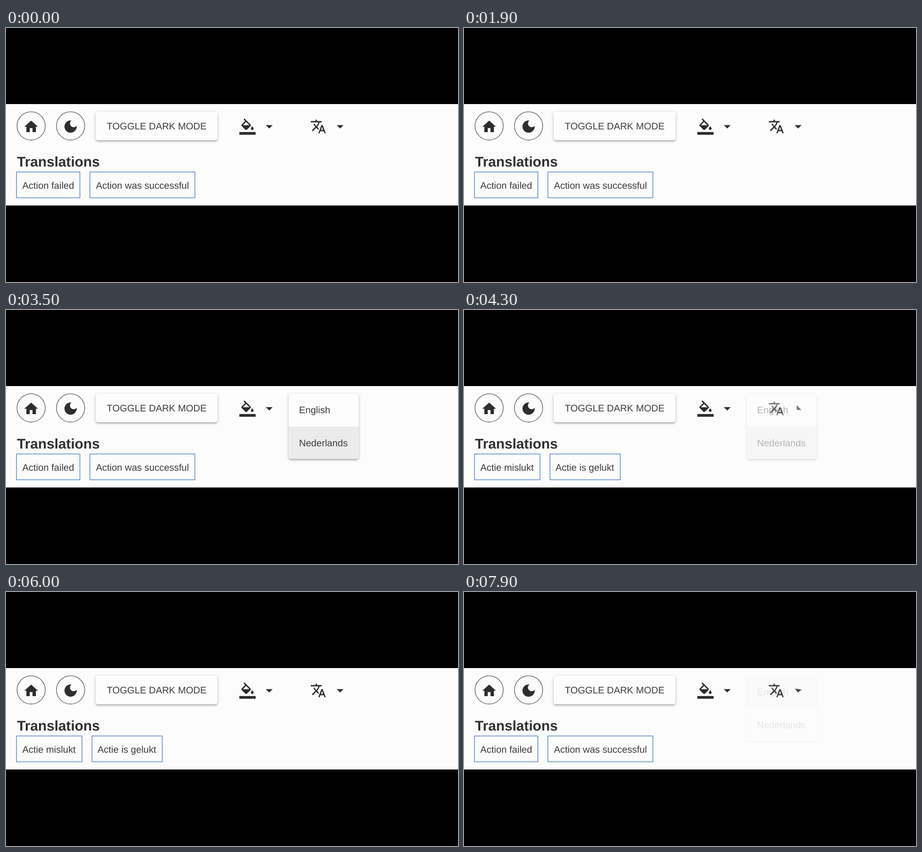
These frames come from a looping animation (998 px wide and 561 px high, 8 s). An HTML page:

```html
<!DOCTYPE html>
<html lang="en">
<head>
<meta charset="utf-8">
<title>Language menu</title>
<style>
  html, body { margin: 0; width: 100%; height: 100%; overflow: hidden; background: #000; }
  body { position: relative; }
  .page, .card, .menu, .row, svg { position: absolute; }
  .page { left: 0; top: 168px; width: 998px; height: 224px; background: #fcfcfc; }
  svg { left: 0; top: 0; width: 998px; height: 561px; }
  text { font: 21px "Liberation Sans", Arial, sans-serif; fill: #3b3b3b; text-rendering: geometricPrecision; }
  .title { font-size: 31px; font-weight: bold; fill: #303030; }
  .card, .menu {
    background: #fdfdfd; border-radius: 5px;
    box-shadow: 0 1.5px 7px rgba(0,0,0,.2), 0 3px 3px rgba(0,0,0,.14), 0 4px 2px -3px rgba(0,0,0,.12);
  }
  .card { left: 198px; top: 184.5px; width: 269px; height: 63px; }
  .menu { left: 624px; top: 184.5px; width: 154.5px; height: 144.5px; overflow: hidden; }
  .row { left: 0; top: 0; width: 100%; height: 72.5px; background: #ebebeb; }
  .menu svg { left: -624px; top: -184.5px; }
  .icon { fill: #2d2d2d; }
  .ring { fill: none; stroke: #555; stroke-width: 1.3; }
  .box { fill: none; stroke: #4a7fcd; stroke-width: 1.4; }

  .menu, .row, .hover, .ripple, .arrow, .english, .dutch { animation: 8s linear infinite; }
  .arrow, .ripple { transform-box: fill-box; transform-origin: center; }
  .menu { animation-name: fade; }
  .row { animation-name: pick; animation-timing-function: step-end; }
  .hover { animation-name: hover; }
  .ripple { animation-name: ripple; }
  .arrow { animation-name: turn; transform-origin: 50% 40%; }
  .english { animation-name: english; animation-timing-function: step-end; }
  .dutch { animation-name: dutch; animation-timing-function: step-end; }

  @keyframes fade {
    0%, 36.13%, 82.45% { opacity: 0; animation-timing-function: cubic-bezier(.215,.61,.355,1); }
    39.88%, 86.2% { opacity: 1; }
    52.75%, 97.45% { opacity: 1; animation-timing-function: cubic-bezier(.215,.61,.355,1); }
    56.5%, 100% { opacity: 0; }
  }
  @keyframes pick {
    0% { transform: none; }
    41.25% { transform: translateY(72.5px); }
    62.5%, 100% { transform: none; }
  }
  @keyframes hover {
    0%, 31.25%, 38.75%, 76.9%, 84%, 100% { opacity: 0; }
    33.75%, 36.25%, 79.4%, 81.75% { opacity: .14; }
  }
  @keyframes ripple {
    0%, 35.24% { opacity: 0; transform: scale(.2); }
    35.25%, 81.5% { opacity: .1; transform: scale(.2); animation-timing-function: ease-out; }
    38.06%, 84.31% { opacity: .2; transform: scale(.92); }
    41.5%, 87.75% { opacity: 0; transform: scale(1); }
    41.51%, 81.49% { opacity: 0; transform: scale(.2); }
    100% { opacity: 0; transform: scale(1); }
  }
  @keyframes turn {
    0%, 35.2%, 81.5% { transform: rotate(0); animation-timing-function: ease; }
    38.7%, 85% { transform: rotate(180deg); }
    52.25%, 96.25% { transform: rotate(180deg); animation-timing-function: ease; }
    55.75%, 99.75%, 100% { transform: rotate(0); }
  }
  @keyframes english {
    0% { visibility: visible; }
    52.5% { visibility: hidden; }
    96.5%, 100% { visibility: visible; }
  }
  @keyframes dutch {
    0% { visibility: hidden; }
    52.5% { visibility: visible; }
    96.5%, 100% { visibility: hidden; }
  }
</style>
</head>
<body>
<div class="page"></div>
<div class="card"></div>
<svg viewBox="0 0 998 561">
  <defs>
    <clipPath id="button"><rect x="648" y="184.5" width="132" height="63" rx="4.5"/></clipPath>
  </defs>

  <circle class="ring" cx="55.5" cy="216.3" r="31.2"/>
  <circle class="ring" cx="142.6" cy="216.3" r="31.2"/>
  <path class="icon" transform="translate(37.5 200) scale(1.5)" d="M10 20v-6h4v6h5v-8h3L12 3 2 12h3v8z"/>
  <path class="icon" transform="translate(124.6 199.7) scale(1.5)" d="M12 3c-4.97 0-9 4.03-9 9s4.03 9 9 9 9-4.03 9-9c0-.46-.04-.92-.1-1.36-.98 1.37-2.58 2.26-4.4 2.26-2.98 0-5.4-2.42-5.4-5.4 0-1.81.89-3.42 2.26-4.4-.44-.06-.9-.1-1.36-.1z"/>
  <text x="222.5" y="223.7">TOGGLE DARK MODE</text>

  <path class="icon" transform="translate(515.2 199.8) scale(1.5)" d="M16.56 8.94L7.62 0 6.21 1.41l2.38 2.38-5.15 5.15c-.59.59-.59 1.54 0 2.12l5.5 5.5c.29.29.68.44 1.06.44s.77-.15 1.06-.44l5.5-5.5c.59-.58.59-1.53 0-2.12zM5.21 10L10 5.21 14.79 10zM19 11.5s-2 2.17-2 3.5c0 1.1.9 2 2 2s2-.9 2-2c0-1.33-2-3.5-2-3.5zM0 20h24v4H0z"/>
  <path class="icon" transform="translate(563.2 199.5) scale(1.5)" d="M7 10l5 5 5-5z"/>

  <g clip-path="url(#button)">
    <rect class="hover" x="648" y="184" width="132" height="64" fill="#2d2d38"/>
    <circle class="ripple" cx="712" cy="216" r="72" fill="#2d2d38"/>
  </g>
  <path class="icon" transform="translate(671.5 199.5) scale(1.5)" d="M12.87 15.07l-2.54-2.51.03-.03c1.74-1.94 2.98-4.17 3.71-6.53H17V4h-7V2H8v2H1v1.99h11.17C11.5 7.92 10.44 9.75 9 11.35 8.07 10.32 7.3 9.19 6.69 8h-2c.73 1.63 1.73 3.17 2.98 4.56l-5.09 5.02L4 19l5-5 3.11 3.11zM18.5 10h-2L12 22h2l1.12-3h4.75L21 22h2zm-2.62 7l1.62-4.33L19.12 17z"/>
  <g transform="translate(719.7 199.5) scale(1.5)"><path class="icon arrow" d="M7 10l5 5 5-5z"/></g>

  <text class="title" x="24.3" y="306.4">Translations</text>
  <g class="english">
    <rect class="box" x="23.2" y="318" width="140" height="57"/>
    <rect class="box" x="185.3" y="318" width="231.8" height="57"/>
    <text x="36" y="354.8">Action failed</text>
    <text x="198.4" y="354.8">Action was successful</text>
  </g>
  <g class="dutch">
    <rect class="box" x="23.2" y="318" width="144.5" height="57"/>
    <rect class="box" x="189.9" y="318" width="155.1" height="57"/>
    <text x="36" y="354.8">Actie mislukt</text>
    <text x="202" y="354.8">Actie is gelukt</text>
  </g>
</svg>
<div class="menu">
  <div class="row"></div>
  <svg viewBox="0 0 998 561">
    <text x="647" y="228.4">English</text>
    <text x="647" y="300.6">Nederlands</text>
  </svg>
</div>
</body>
</html>
```
